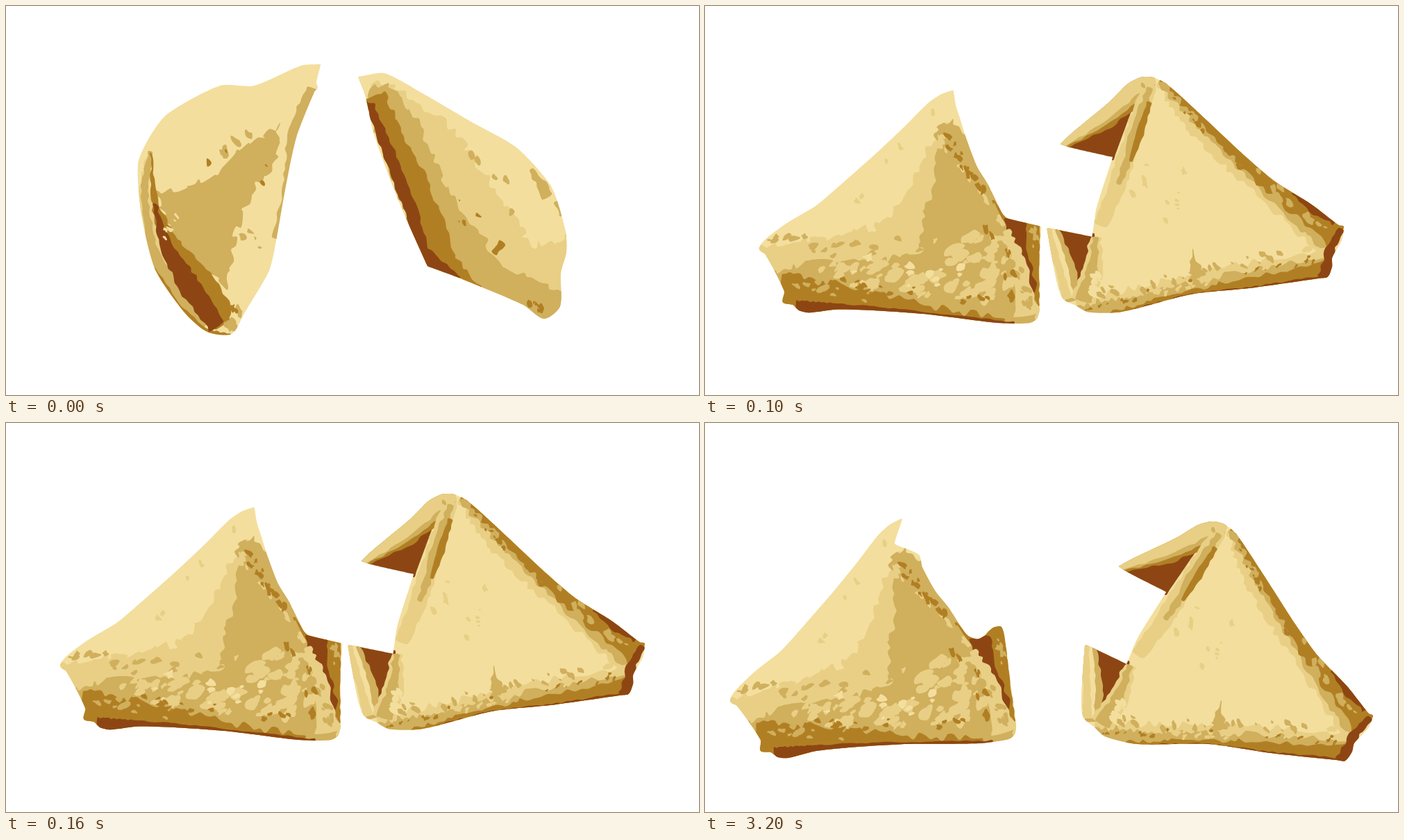
Animation of 998x561 px, one loop 5200 ms. Source, as an HTML page with a canvas:

```html
<!DOCTYPE html>
<html lang="en">
<head>
<meta charset="utf-8">
<title>Cookie halves</title>
<style>
html, body { margin: 0; width: 100%; height: 100%; overflow: hidden; background: #fff; }
canvas { display: block; }
</style>
</head>
<body>
<canvas id="stage" width="998" height="561"></canvas>
<script>
const ctx = document.getElementById('stage').getContext('2d');
const LIGHT = '#f3de9d', PALE = '#e8cf85', TAN = '#d0af5d', BROWN = '#b17f23', DARK = '#8d4613';

let seed = 1;
const rand = () => (seed = seed * 16807 % 2147483647) / 2147483647;
const jitter = amount => (rand() * 2 - 1) * amount;
const parse = text => text.trim().split(/\s+/).map(pair => pair.split(',').map(Number));
const length = ([x, y], [u, v]) => Math.hypot(u - x, v - y);

// Value at t = 0..1 along a list of points or numbers.
function along(list, t) {
  const last = list.length - 1;
  const k = Math.max(0, Math.min(last - 1, Math.floor(t * last))), f = t * last - k;
  const mix = (a, b) => a + (b - a) * f;
  const a = list[k], b = list[k + 1];
  return a.length ? [mix(a[0], b[0]), mix(a[1], b[1])] : mix(a, b);
}

// Closed smooth curve through all points.
function smooth(points) {
  const path = new Path2D(), n = points.length;
  const slopes = points.map((p, i) => {
    const a = points[(i + n - 1) % n], b = points[(i + 1) % n], d = length(a, b) || 1;
    return [(b[0] - a[0]) / d, (b[1] - a[1]) / d];
  });
  path.moveTo(...points[0]);
  points.forEach((p, i) => {
    const j = (i + 1) % n, q = points[j], h = slopes[i], g = slopes[j], s = length(p, q) * .24;
    path.bezierCurveTo(p[0] + h[0] * s, p[1] + h[1] * s, q[0] - g[0] * s, q[1] - g[1] * s, ...q);
  });
  return path;
}

function fill(color, path) {
  ctx.fillStyle = color;
  ctx.fill(path);
}

// Flat tone whose border is broken into short, displaced steps.
function area(color, text, rough) {
  const corners = parse(text);
  fill(color, smooth(corners.flatMap((p, i) => {
    const q = corners[(i + 1) % corners.length], steps = Math.ceil(length(p, q) / 8);
    return Array.from({ length: steps }, (_, k) =>
      along([p, q], k / steps).map(v => v + jitter(rough)));
  })));
}

// Ragged tones of varying half-width along a line, widest first.
function bands(text, rough, layers) {
  const line = parse(text), steps = Math.ceil(length(line[0], line.at(-1)) / 7);
  for (const [color, ...widths] of layers) {
    const near = [], far = [];
    for (let i = 0; i <= steps; i++) {
      const t = i / steps, [x, y] = along(line, t);
      const a = along(line, t - .03), b = along(line, t + .03), d = length(a, b);
      const nx = (a[1] - b[1]) / d, ny = (b[0] - a[0]) / d, w = along(widths, t);
      const u = w + jitter(rough), v = w + jitter(rough);
      near.push([x + nx * u, y + ny * u]);
      far.unshift([x - nx * v, y - ny * v]);
    }
    fill(color, smooth([...near, ...far]));
  }
}

// Irregular crumbs spread around a line.
function scatter(color, text, spread, count, size, angle = 1) {
  const line = parse(text);
  for (let i = 0; i < count; i++) {
    const [x, y] = along(line, rand()).map(v => v + jitter(spread));
    const r = size * (.4 + rand()), turn = angle + jitter(.6), c = Math.cos(turn), s = Math.sin(turn);
    fill(color, smooth(Array.from({ length: 8 }, (_, k) => {
      const a = k * Math.PI / 4, d = r * (.5 + rand() * .7);
      const u = Math.cos(a) * d * 1.4, v = Math.sin(a) * d * .8;
      return [x + u * c - v * s, y + u * s + v * c];
    })));
  }
}

// One clipped piece; move is [toX, toY, degrees, fromX, fromY].
function half(outline, paint, [toX, toY, degrees, fromX, fromY] = [0, 0, 0, 0, 0]) {
  seed = 77;
  ctx.save();
  ctx.translate(toX, toY);
  ctx.rotate(degrees * Math.PI / 180);
  ctx.translate(-fromX, -fromY);
  const shape = smooth(parse(outline));
  fill(LIGHT, shape);
  ctx.clip(shape);
  paint();
  ctx.restore();
}

const closedLeft = `190,228 205,192 232,156 308,115 357,115 425,86 452,84 453,85 447,110 449,118 444,124
  418,190 402,265 386,355 378,384 342,445 325,473 290,470 258,443 215,380 195,300`;

function paintClosedLeft() {
  area(TAN, '215,270 250,262 305,245 328,215 395,172 385,230 352,270 330,330 322,405 250,360', 5);
  bands('446,121 418,185 403,260 391,335', 2, [[TAN, 14, 14, 3, 7]]);
  bands('208,210 199,270 209,345 240,415 285,462', 2, [[PALE, 3, 9, 11, 12, 8], [TAN, 4, 5, 6, 14, 8]]);
  bands('208,212 214,285 236,345 276,400 318,455', 2, [[BROWN, 1, 4, 14, 24, 18]]);
  bands('214,378 248,435 287,472 323,477', 1, [[BROWN, 1, 5, 6, 4]]);
  bands('213,285 230,345 265,405 304,462', 2, [[DARK, 3, 9, 16, 12]]);
  area(LIGHT, '318,470 328,430 352,408 345,450', 2);
  scatter(TAN, '318,473 336,437', 3, 4, 6);
  scatter(BROWN, '330,437 329,437', 3, 2, 4);
  scatter(LIGHT, '231,330 245,295', 6, 6, 4);
  scatter(TAN, '291,226 324,203 354,183', 1, 4, 7);
  scatter(TAN, '337,341 357,320 372,372', 3, 4, 5);
  scatter(BROWN, '289,229 324,203', 1, 2, 5);
  scatter(BROWN, '365,269 405,129', 1, 2, 3);
}

const closedRight = `507,102 508,102 545,97 600,126 670,167 735,204 785,260 806,325 807,355 799,385 798,433
  775,451 745,431 650,391 609,376 607,375 565,280 530,185 517,128`;

function paintClosedRight() {
  area(PALE, '512,112 550,108 632,165 665,205 700,262 735,308 755,345 795,343 812,325 810,450 770,460 600,380', 5);
  area(TAN, '515,118 555,114 600,180 625,245 660,305 691,340 712,375 760,395 800,408 800,455 765,450 600,380', 5);
  area(BROWN, '519,135 545,125 566,175 604,245 632,315 645,360 682,405 605,380', 3);
  area(DARK, '516,138 530,142 560,210 590,285 608,348 655,393 604,380', 1.5);
  area(LIGHT, '507,101 528,105 520,133 512,125', 1);
  bands('757,235 780,275', 3, [[TAN, 4, 9]]);
  bands('793,282 801,302', 1, [[TAN, 4, 3]]);
  scatter(TAN, '656,177 684,241 732,252 729,314', 2, 5, 5);
  bands('715,341 703,357', 1, [[BROWN, 5, 4]]);
  scatter(BROWN, '608,201 652,275 653,317 683,301', 1, 5, 3);
  scatter(BROWN, '755,426 770,440 794,430', 4, 6, 4);
}

// The torn side differs between the two poses of the open left piece.
const openLeft = torn => `36,402 42,388 70,360 110,328 146,288 185,243 220,200 250,161 267,146 283,138 284,139
  ${torn.tip} 313,208 332,243 350,265 378,306 ${torn.flap} 438,360 448,435 446,449 437,456
  395,462 290,463 220,467 160,473 120,483 105,482 95,475 80,473 80,457 46,408`;
const shortTear = { tip: '273,173 276,176 308,190', flap: '395,311 415,295 427,294 433,318' };
const longTear = { tip: '290,159 298,176', flap: '386,311 434,316 435,317' };

function paintOpenLeft() {
  area(PALE, '38,400 70,387 150,368 215,335 245,265 262,215 281,183 330,225 460,460 60,480', 5);
  area(TAN, '267,193 290,183 315,204 445,420 450,465 70,480 55,436 120,408 200,398 270,375 262,340 272,280', 5);
  scatter(LIGHT, '150,320 185,350 215,345', 12, 9, 6);
  scatter(PALE, '95,385 190,378 280,365', 14, 18, 7, -.5);
  scatter(TAN, '55,387 140,385 260,365', 12, 18, 5, -.5);
  scatter(PALE, '140,420 220,415 290,422 380,420', 18, 45, 8, -.5);
  scatter(LIGHT, '180,410 260,412 330,400', 18, 14, 5, -.6);
  scatter(PALE, '315,370 350,350 400,425', 20, 30, 8, -.6);
  scatter(PALE, '270,205 300,235 355,295 400,355', 8, 14, 5);
  bands('75,473 160,470 270,463 400,459', 6, [[BROWN, 44, 31, 14, 3]]);
  scatter(TAN, '90,440 150,447 210,450', 7, 10, 5, -.2);
  scatter(BROWN, '150,436 250,440 390,435', 12, 20, 4, -.2);
  bands('100,478 160,473 270,465 414,460', 1, [[DARK, 10, 9, 5, 2]]);
  area(BROWN, '362,288 379,306 400,310 415,293 430,293 447,430 420,400 385,324', 1);
  area(DARK, '380,313 413,307 416,345 438,400 436,414 404,360', 2);
  scatter(TAN, '424,310 432,375', 4, 6, 4);
  bands('386,328 408,368 432,445', 3, [[PALE, 5, 9, 17]]);
  scatter(TAN, '395,355 415,400 430,440', 8, 14, 5);
  scatter(BROWN, '290,210 320,250 365,292', 8, 20, 4);
  scatter(BROWN, '350,330 395,355 401,440', 8, 8, 5);
  scatter(PALE, '274,152 160,320 219,295', 6, 5, 5);
}

const openRight = `596,207 597,206 615,196 680,165 710,147 731,142 748,146 765,160 805,220 850,290 882,335
  925,380 956,419 962,422 955,440 935,462 932,474 922,487 909,486 815,476 725,463 622,463 576,452
  560,438 545,425 542,400 547,321 549,320 606,347 607,348 622,312 635,290 664,244 663,243 612,217`;

function paintOpenRight() {
  area(DARK, '600,212 712,178 664,248', 0);
  bands('596,207 660,176 720,146 750,146', 1.5, [[BROWN, 9, 28, 32, 10], [TAN, 8, 22, 25, 12], [PALE, 6, 17, 18, 12]]);
  bands('742,155 709,207 671,268 624,335', 2, [[PALE, 10, 12, 13, 9]]);
  bands('740,160 703,222 664,284', 2, [[TAN, 4, 9, 3]]);
  bands('735,180 712,218 688,256', 1, [[BROWN, 3, 6, 2]]);
  bands('760,152 805,220 865,310 960,424', 4, [[PALE, 9, 32, 32, 50], [TAN, 8, 16, 24, 42], [BROWN, 1, 7, 18, 32]]);
  bands('560,452 650,462 770,469 925,487', 5, [[PALE, 22, 27, 34, 40], [TAN, 14, 17, 21, 30]]);
  area(TAN, '728,445 742,403 754,445', 3);
  bands('600,463 680,464 770,470 925,487', 3, [[BROWN, 3, 7, 11, 22]]);
  bands('640,463 725,465 820,477 922,488', 1, [[DARK, 0, 3, 2, 4]]);
  bands('903,357 930,386 952,412', 2, [[DARK, 3, 11, 5]]);
  bands('958,425 937,447 918,487', 2, [[DARK, 4, 7, 9]]);
  area(DARK, '558,322 612,345 575,428 560,425', 1);
  bands('550,320 558,380 560,430', 2, [[TAN, 14, 15, 12]]);
  bands('545,320 550,380 550,425', 1, [[LIGHT, 13, 13, 10], [PALE, 8, 5, 7]]);
  bands('612,350 596,395 573,435', 2, [[PALE, 7, 15, 18], [TAN, 4, 8, 12]]);
  scatter(LIGHT, '600,400 590,435', 7, 8, 5);
  scatter(TAN, '590,428 650,436 750,435 870,440', 7, 24, 4);
  scatter(PALE, '670,447 780,448 910,445', 8, 20, 5, -.4);
  scatter(BROWN, '570,445 630,447 740,450 910,457', 6, 20, 3, -.5);
  scatter(TAN, '860,320 890,370 930,430', 12, 16, 5);
  scatter(BROWN, '762,170 800,235 855,310', 8, 14, 4);
  scatter(TAN, '733,152 731,153', 1, 1, 6);
  scatter(PALE, '738,215 676,299 777,289 706,360', 12, 12, 4);
}

const scenes = [
  () => {
    half(closedLeft, paintClosedLeft);
    half(closedRight, paintClosedRight);
  },
  () => {
    half(openLeft(longTear), paintOpenLeft, [357, 121.5, 7.5, 283, 138]);
    half(openRight, paintOpenRight, [627, 103, -14.2, 731, 142]);
  },
  () => {
    half(openLeft(shortTear), paintOpenLeft);
    half(openRight, paintOpenRight);
  }
];

let shown = -1;
function tick() {
  const time = performance.now() % 5200;
  const scene = time < 100 ? 0 : time < 200 ? 1 : 2;
  if (scene !== shown) {
    shown = scene;
    ctx.fillStyle = '#fff';
    ctx.fillRect(0, 0, 998, 561);
    scenes[scene]();
  }
  requestAnimationFrame(tick);
}
tick();
</script>
</body>
</html>
```
